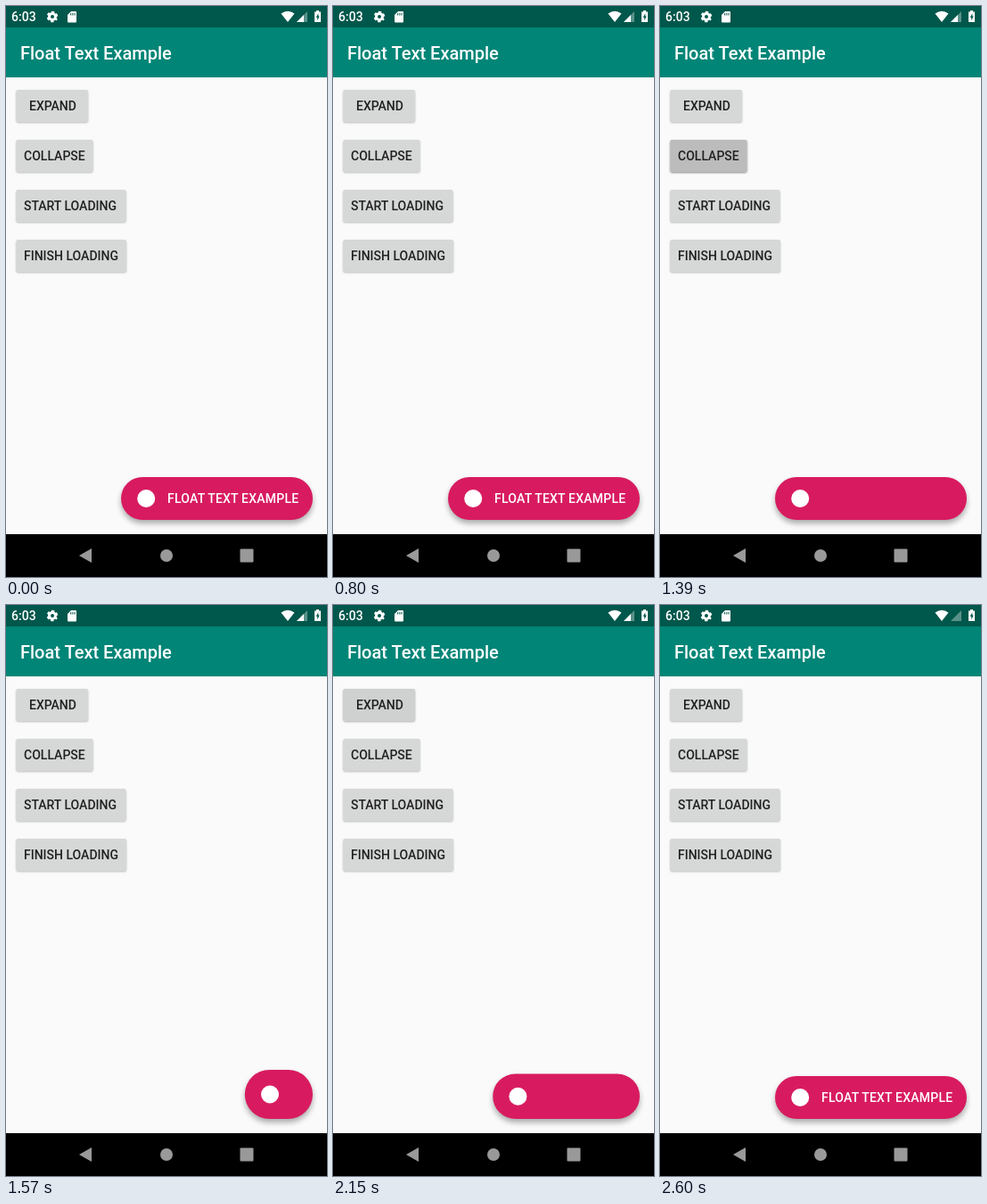
Animation of 360x640 px, one loop 2970 ms. Source, as an HTML page:

```html
<!DOCTYPE html>
<html lang="en">
<head>
<meta charset="utf-8">
<title>Float Text Example</title>
<style>
html, body { margin: 0; width: 100%; height: 100%; overflow: hidden; background: #fafafa; }
svg { display: block; width: 360px; height: 640px; }
text { font: 500 14px Roboto, sans-serif; }
</style>
</head>
<body>
<svg viewBox="0 0 360 640" xmlns="http://www.w3.org/2000/svg">
  <defs>
    <filter id="soft" x="-30%" y="-50%" width="160%" height="200%"><feGaussianBlur stdDeviation="3.2"/></filter>
    <filter id="thin" x="-20%" y="-30%" width="140%" height="160%"><feGaussianBlur stdDeviation="1"/></filter>
  </defs>
  <rect width="360" height="640" fill="#fafafa"/>
  <rect width="360" height="24" fill="#00574b"/>
  <rect y="24" width="360" height="56" fill="#008577"/>
  <text x="16" y="60" fill="#fff" style="font-size:20px">Float Text Example</text>

  <g fill="#fff">
    <text x="6" y="17">6:03</text>
    <g transform="translate(52 12)" fill="none" stroke="#fff">
      <circle r="3.5" stroke-width="3"/>
      <circle r="5.3" stroke-width="2" stroke-dasharray="3.1 2.45" stroke-dashoffset="1.55" transform="rotate(30)"/>
    </g>
    <path d="M73 6H78Q79 6 79 7V17.500Q79 18.500 78 18.500H70Q69 18.500 69 17.500V10Z"/>
    <path d="M72.700 8v2.500M74.900 8v2.500M77.100 8v2.500" stroke="#00574b" stroke-width="1"/>
    <path d="M308.500 8.500Q316 3 323.500 8.500L316 18Z"/>
    <path d="M326 18H338V6Z" opacity=".35"/>
    <path id="bars" d="M326 18H334V10Z"/>
    <path d="M348 5h3v1.500h2V18h-7V6.500h2Z"/>
    <path d="M350.300 8.200L347.700 12.800H349.200V16.200L351.700 11.600H350.300Z" fill="#00574b"/>
  </g>

  <g id="buttons"></g>

  <rect id="shade" opacity=".32" filter="url(#soft)"/>
  <rect id="fab" fill="#d81b60"/>
  <circle id="icon" r="10" fill="#fff"/>
  <text id="label" x="181" y="557" fill="#fff" letter-spacing=".2">FLOAT TEXT EXAMPLE</text>

  <rect y="592" width="360" height="48"/>
  <g fill="#999">
    <path d="M96 608V624L82 616Z"/>
    <circle cx="180" cy="616" r="7"/>
    <rect x="262.500" y="608.500" width="15" height="15" rx="1"/>
  </g>
</svg>
<script>
const LOOP = 2970;
const RESIZE = 300;
const SHRINK = 1390;
const EXTEND = 2020;

const $ = id => document.getElementById(id);
const clamp = v => Math.min(1, Math.max(0, v));
const ramp = (t, from, length) => clamp((t - from) / length);
const mix = (a, b, k) => a + (b - a) * k;

function set(el, attrs) {
  for (const key in attrs) el.setAttribute(key, attrs[key]);
}

function add(parent, tag, attrs) {
  const el = document.createElementNS("http://www.w3.org/2000/svg", tag);
  set(el, attrs);
  return parent.appendChild(el);
}

// Standard curve: cubic-bezier(.4, 0, .2, 1)
function ease(x) {
  let lo = 0, hi = 1, s = x;
  for (let i = 0; i < 18; i++) {
    s = (lo + hi) / 2;
    const bx = 1.2 * s * (1 - s) ** 2 + 0.6 * s * s * (1 - s) + s ** 3;
    if (bx < x) lo = s; else hi = s;
  }
  return s * s * (3 - 2 * s);
}

function makeButton(name, y, width, textX) {
  const box = { x: 11.5, y, width, height: 36, rx: 2 };
  const group = $("buttons");
  const shadow = add(group, "rect", { ...box, y: y + 1, opacity: 0.25, filter: "url(#thin)" });
  add(group, "rect", { ...box, fill: "#d6d7d7" });
  const clipId = "clip" + y;
  add(add(group, "clipPath", { id: clipId }), "rect", box);
  const wave = add(group, "circle", { r: 0, fill: "#bbbcbb", "clip-path": `url(#${clipId})` });
  add(group, "text", { x: textX, y: y + 23, fill: "#202020" }).textContent = name;
  return { shadow, wave, y, width };
}

const expand = makeButton("EXPAND", 94, 80.5, 26);
const collapse = makeButton("COLLAPSE", 150, 86, 20);
makeButton("START LOADING", 206, 123, 20);
makeButton("FINISH LOADING", 262, 123.5, 20);

function press(button, t, down, up) {
  const grow = ramp(t, down, 150);
  const on = t >= down ? 1 - ramp(t, up, 150) : 0;
  set(button.wave, {
    cx: 11.5 + button.width / 2 + 2,
    cy: button.y + 24,
    r: 54 * grow,
    opacity: on * clamp(grow * 3)
  });
  set(button.shadow, { opacity: 0.25 + 0.2 * grow * on });
}

function draw(t) {
  press(collapse, t, SHRINK - 320, SHRINK + 20);
  press(expand, t, EXTEND - 320, EXTEND + 20);

  const small = ease(ramp(t, SHRINK, RESIZE)) - ease(ramp(t, EXTEND, RESIZE));
  const width = mix(215, 57, small);
  const height = mix(48, 56, small);
  const x = 344 - width, y = 576 - height;
  const box = { x, y, width, height, rx: height / 2 };
  set($("fab"), box);
  set($("shade"), { ...box, y: y + 4 });
  set($("icon"), { cx: x + 28.2, cy: y + height / 2 });

  // The label is absent from the start of shrinking to the end of extending
  const hidden = t >= SHRINK && t < EXTEND + RESIZE;
  set($("label"), { opacity: hidden ? 0 : 1 });
  set($("bars"), { opacity: t < 2400 ? 1 : 0 });
}

const start = performance.now();
function tick() {
  draw((performance.now() - start) % LOOP);
  requestAnimationFrame(tick);
}
tick();
</script>
</body>
</html>
```
